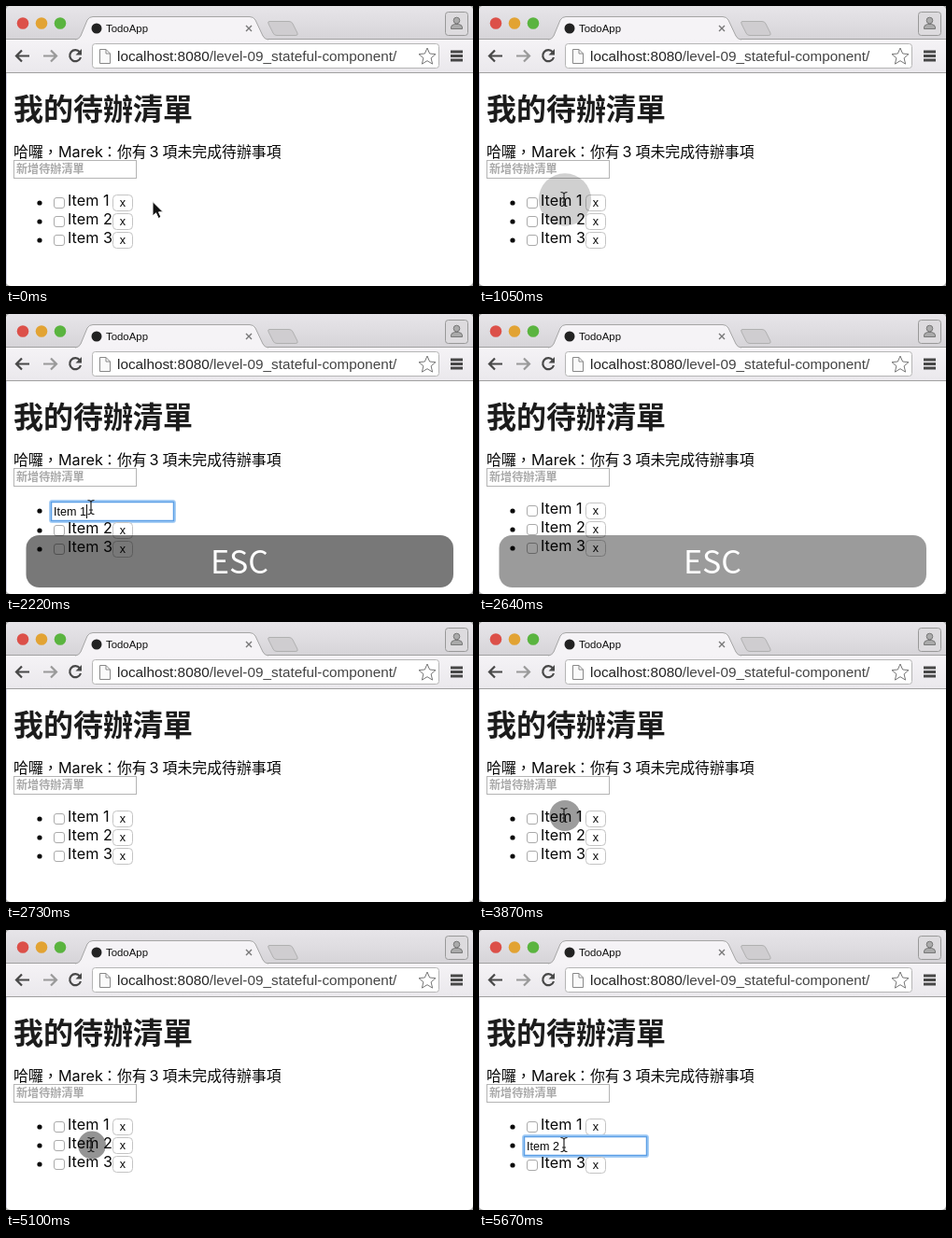
An HTML page for the animation above (5700 ms loop, 500x300 px).

```html
<!DOCTYPE html>
<html lang="zh-Hant">
<head>
<meta charset="utf-8">
<style>
html, body { margin: 0; width: 100%; height: 100%; overflow: hidden; }
svg { display: block; width: 500px; height: 300px; }
text { white-space: pre; }
.ui { font-family: "Liberation Sans", sans-serif; }
.cjk { font-family: "Noto Sans CJK TC", "Noto Sans CJK", sans-serif; }
.page { font: 16.2px Inter, sans-serif; fill: #080808; }
.page .cjk { font-size: 15.9px; }
.page .small { font-size: 12.6px; }
.line { fill: none; stroke: #484848; stroke-width: 2.2; }
</style>
</head>
<body>
<svg viewBox="0 0 500 300">
  <defs>
    <linearGradient id="bar" x2="0" y2="1">
      <stop stop-color="#e7e5e9"/><stop offset="1" stop-color="#d6d4d8"/>
    </linearGradient>
    <linearGradient id="tool" x2="0" y2="1">
      <stop stop-color="#f5f3f6"/><stop offset="1" stop-color="#eae8ec"/>
    </linearGradient>
    <clipPath id="window"><rect width="500" height="300" rx="5"/></clipPath>
  </defs>
  <rect width="500" height="300" fill="#aaa"/>
  <g clip-path="url(#window)">
    <rect width="500" height="300" fill="#fff"/>
    <path d="M.5 72V300" stroke="#d5d5e6"/>
    <rect width="500" height="36" fill="url(#bar)"/>
    <rect y="35.5" width="500" height="36" fill="url(#tool)"/>
    <path d="M0 35.5H76M280 35.5H500M0 71.5H500" stroke="#a0a0a0"/>
    <circle cx="18" cy="18.5" r="6.3" fill="#dc5049"/>
    <circle cx="38" cy="18.5" r="6.3" fill="#e2a333"/>
    <circle cx="58" cy="18.5" r="6.3" fill="#5ab43f"/>
    <path d="M74 36Q78 36 80 32L87 15Q89 11.5 93 11.5H261Q265 11.5 267 15L275 32Q277 36 281 36" fill="#f5f3f6" stroke="#a5a5a5"/>
    <path d="M282 16.5H303Q306 16.5 307 19L312 29Q313 31.500 310 31.500H290Q287 31.500 286 29L281 19Q280 16.5 282 16.5Z" fill="#cfcdd0" stroke="#b0b0b0"/>
    <circle cx="97" cy="24" r="5.5" fill="#222"/>
    <text class="ui" x="107" y="28" font-size="11.4" fill="#111">TodoApp</text>
    <path d="M257 21l6 6m0-6l-6 6" class="line" style="stroke:#777;stroke-width:1.4"/>
    <rect x="470.5" y="6.5" width="24" height="25" rx="3" fill="#dddbde" stroke="#999"/>
    <path d="M476.500 24.500v-1.500q0-3 4-3.500h4q4 .5 4 3.500v1.500z" fill="#aaa" stroke="#777"/>
    <circle cx="482.5" cy="15.500" r="3.300" fill="#aaa" stroke="#777"/>
    <path class="line" d="M25 53.5H11M17 47.5L11 53.5L17 59.5"/>
    <path class="line" d="M40 53.5H54M48 47.5L54 53.5L48 59.5" style="stroke:#999"/>
    <path class="line" d="M79 49.5A6 6 0 1 0 80 55"/>
    <path d="M81 46v6.500h-6.500z" fill="#484848"/>
    <rect x="92.5" y="40.5" width="371" height="26" rx="3" fill="#fff" stroke="#b5b5b5"/>
    <path d="M100.5 46.5H107L111.5 51V61.5H100.5ZM107 46.5V51H111.5" fill="#fafafa" stroke="#888"/>
    <text class="ui" x="119" y="59" font-size="15.3" fill="#222">localhost:8080<tspan fill="#444">/level-09_stateful-component/</tspan></text>
    <path d="M451 45l2.600 6 6.400.6-4.900 4.200 1.500 6.300-5.600-3.400-5.600 3.400 1.500-6.300-4.900-4.200 6.400-.6z" fill="#fff" stroke="#777"/>
    <path class="line" d="M476 49H489M476 53.5H489M476 58H489" style="stroke-width:3"/>

    <text class="cjk" x="8" y="122" font-size="32" font-weight="700" fill="#1c1c1c">我的待辦清單</text>
    <g class="page">
      <text class="cjk" x="8" y="162">哈囉，</text>
      <text x="56" y="162">Marek</text>
      <text class="cjk" x="103" y="162">：你有</text>
      <text x="153.5" y="162">3</text>
      <text class="cjk" x="167.5" y="162">項未完成待辦事項</text>
    </g>
    <rect x="8.5" y="165.5" width="131" height="19" fill="#fff" stroke="#b4b4b4"/>
    <text class="cjk" x="11" y="179" font-size="12.1" font-weight="700" fill="#a9a9a9">新增待辦清單</text>
    <g id="list" class="page"></g>
    <circle id="ripple"/>
    <path id="arrow" d="M0 0V15.5L3.600 12.300L6.200 18L9 16.800L6.500 11.300H11.300Z" fill="#111" stroke="#fff"/>
    <path id="beam" d="M-3.5 -7.5Q0 -7.5 0 -5Q0 -7.5 3.5 -7.5M0 -5V5M-3.5 7.5Q0 7.5 0 5Q0 7.5 3.5 7.5M-2 3H2" fill="none" stroke="#222" stroke-width="1.2"/>
    <g id="key">
      <rect x="21.5" y="237" width="457.5" height="56" rx="14" fill="#000" fill-opacity=".53"/>
      <text class="cjk" x="250" y="278" font-size="34" text-anchor="middle" fill="#fff">ESC</text>
    </g>
  </g>
</svg>
<script>
const LOOP = 5700;
const CLICK = 165;
const clicks = [915, 1155, 3630, 3840, 4890, 5085];
// Each edit: row, start, end, caret blink interval
const edits = [[0, 1200, 2640, 480], [0, 3900, 4890, 405], [1, 5190, LOOP, 480]];

const $ = id => document.getElementById(id);
const clamp = v => Math.max(0, Math.min(1, v));
const ease = (t, from, to) => {
  const u = clamp((t - from) / (to - from));
  return u * u * (3 - 2 * u);
};
const show = (el, on) => el.style.display = on ? '' : 'none';

function item(row, y) {
  return `<rect x="51.5" y="${y + 5.5}" width="11" height="11" rx="2.5" fill="#fff" stroke="#aaa"/>
    <text x="66" y="${y + 14}">Item ${row + 1}</text>
    <rect x="114.5" y="${y + 2.5}" width="21" height="17" rx="4" fill="#fff" stroke="#c4c4c4"/>
    <text class="ui small" x="125" y="${y + 15}" text-anchor="middle">x</text>`;
}

function editor(row, y, caret) {
  return `<rect x="47.5" y="${y + 0.5}" width="133" height="22" rx="2" fill="#fff" stroke="#a9cff5" stroke-width="3"/>
    <rect x="48.5" y="${y + 1.5}" width="131" height="20" fill="#fff" stroke="#5b9fe6" stroke-width="1.5"/>
    <text class="ui small" x="51" y="${y + 16}">Item ${row + 1}</text>
    ${caret ? `<path d="M86.5 ${y + 4}v15" stroke="#111"/>` : ''}`;
}

let drawn = '';
function drawList(t) {
  const edit = edits.find(([, from, to]) => t >= from && t < to);
  const active = edit ? edit[0] : -1;
  const caret = edit && Math.floor((t - edit[1]) / edit[3]) % 2 === 0;
  const state = active + '|' + caret;
  if (state === drawn) return;
  drawn = state;
  $('list').innerHTML = [0, 1, 2].map(row => {
    const y = 200 + 20 * row + (edit && row > active ? 1 : 0);
    const bullet = `<circle cx="36" cy="${y + 11}" r="2.6"/>`;
    return bullet + (row === active ? editor(row, y, caret) : item(row, y));
  }).join('');
}

function drawPointer(t) {
  const move = ease(t, 0, 600);
  const x = 157 - 66 * move;
  const y = 209.5 - 2.5 * move + 23 * ease(t, 4390, 4730);
  const overText = x < 114;
  const visible = t < 2640 || t >= 3570;
  show($('arrow'), visible && !overText);
  show($('beam'), visible && overText);
  for (const id of ['arrow', 'beam']) $(id).setAttribute('transform', `translate(${x} ${y})`);

  const start = clicks.find(c => t >= c && t < c + CLICK);
  const ripple = $('ripple');
  show(ripple, start !== undefined);
  if (start === undefined) return;
  const u = (t - start) / CLICK;
  ripple.setAttribute('cx', x + 1);
  ripple.setAttribute('cy', y + 0.5);
  ripple.setAttribute('r', 13.2 + 18.2 * u);
  ripple.setAttribute('fill-opacity', 0.45 - 0.32 * u);
}

function frame(now) {
  const t = now % LOOP;
  drawList(t);
  drawPointer(t);
  $('key').style.opacity = clamp((t - 2130) / 90) * clamp((2730 - t) / 120);
  requestAnimationFrame(frame);
}
frame(0);
</script>
</body>
</html>
```
